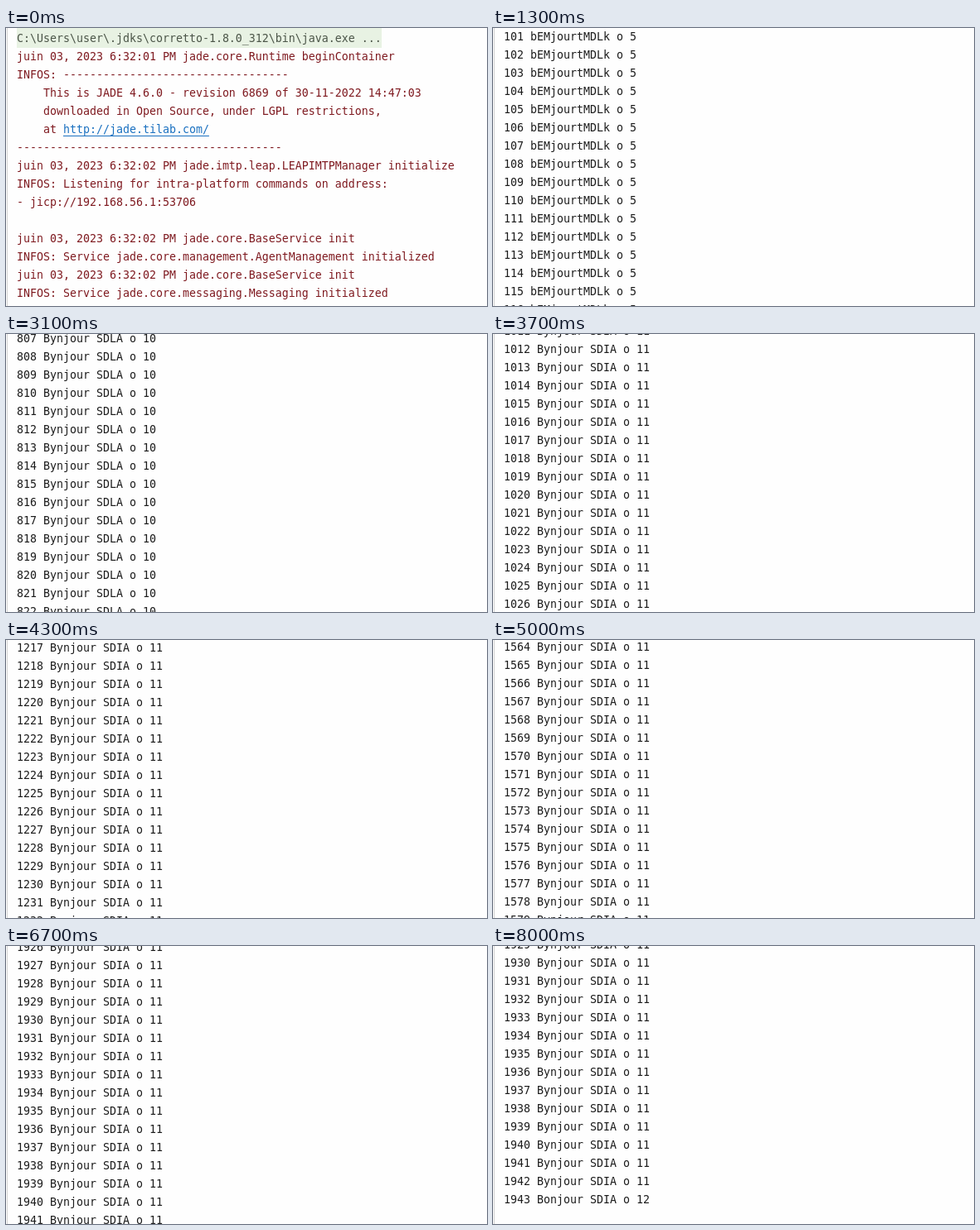
Recreate the animation shown at these times as an HTML page. Size 580 px wide and 336 px high, loop 8.5 s.

```html
<!DOCTYPE html>
<html lang="fr">
<head>
<meta charset="utf-8">
<title>Console</title>
<style>
  html, body { margin: 0; width: 100%; height: 100%; overflow: hidden; background: #fefefe; }
  #console {
    position: relative; width: 580px; height: 336px; overflow: hidden;
    font: 13.29px/22px "DejaVu Sans Mono", monospace; color: #1c1c1c;
  }
  #console::before {
    content: ""; position: absolute; left: 1px; top: 0; width: 1px; height: 100%; background: #d4d4d4;
  }
  .row { position: absolute; left: 13px; top: 0; height: 22px; white-space: pre; }
  .log { color: #7f1a20; }
  .command { color: #4b5548; background: #e8f2e3; box-shadow: 0 -2px #e8f2e3; }
  .link { color: #1a70c0; text-decoration: underline; text-underline-offset: 3px; }
  #caret { position: absolute; left: 13px; top: 319px; width: 2px; height: 17px; background: #000; }
</style>
</head>
<body>
<div id="console"><div id="caret"></div></div>
<script>
const LOOP = 8500, STEP = 100, ROW = 22, TOP = 2;
const stamp = s => `juin 03, 2023 6:32:0${s} PM `;
const dashes = n => "-".repeat(n);
const service = name => [stamp(2) + "jade.core.BaseService init", `INFOS: Service jade.core.${name} initialized`];

const header = [
  "C:\\Users\\user\\.jdks\\corretto-1.8.0_312\\bin\\java.exe ...",
  stamp(1) + "jade.core.Runtime beginContainer",
  "INFOS: " + dashes(34),
  "    This is JADE 4.6.0 - revision 6869 of 30-11-2022 14:47:03",
  "    downloaded in Open Source, under LGPL restrictions,",
  "    at http://jade.tilab.com/",
  dashes(40),
  stamp(2) + "jade.imtp.leap.LEAPIMTPManager initialize",
  "INFOS: Listening for intra-platform commands on address:",
  "- jicp://192.168.56.1:53706",
  "",
  ...service("management.AgentManagement"),
  ...service("messaging.Messaging"),
  ...service("resource.ResourceManagement"),
  ...service("mobility.AgentMobility"),
  ...service("event.Notification"),
  stamp(2) + "jade.core.AgentContainerImpl joinPlatform",
  "INFOS: " + dashes(34),
  "Agent container Container-1@192.168.56.1 is ready.",
  dashes(40)
];

// Best candidate from a given generation onwards
const goal = "Bonjour SDIA", lastGeneration = 1943;
const best = [
  [1, "bEMxqurtMaLk"], [14, "bEMxourtMaLk"], [38, "bEMjourtMaLk"], [70, "bEMjourtMDLk"],
  [150, "bEMjour MDLk"], [190, "bynjour MDLk"], [235, "Bynjour MDLk"], [285, "Bynjour SDLk"],
  [340, "Bynjour SDLA"], [1010, "Bynjour SDIA"], [lastGeneration, goal]
];
const score = text => [...text].filter((c, i) => c === goal[i]).length;

function generation(n) {
  if (n > lastGeneration) return "";
  const text = best.filter(([from]) => from <= n).pop()[1];
  return `${n} ${text} o ${score(text)}`;
}

// [time, generation on the first row]
const scroll = [
  [700, 1 - header.length], [1300, 101.09], [2200, 435.27], [3100, 807.32],
  [4300, 1217.14], [5900, 1891.82], [7000, 1929.636]
];
const secant = i => (scroll[i + 1][1] - scroll[i][1]) / (scroll[i + 1][0] - scroll[i][0]);
const slope = scroll.map((_, i) => {
  if (i === 0 || i === scroll.length - 1) return 0;
  const a = secant(i - 1), b = secant(i);
  return 2 * a * b / (a + b);
});

// Monotone cubic through the scroll points
function firstRow(t) {
  const end = scroll.length - 1;
  if (t <= scroll[0][0]) return scroll[0][1];
  if (t >= scroll[end][0]) return scroll[end][1];
  const i = scroll.findIndex(p => p[0] > t) - 1;
  const [t0, v0] = scroll[i], [t1, v1] = scroll[i + 1];
  const d = t1 - t0, u = (t - t0) / d, u2 = u * u, u3 = u2 * u;
  return v0 + (v1 - v0) * (3 * u2 - 2 * u3) +
    d * (slope[i] * (u3 - 2 * u2 + u) + slope[i + 1] * (u3 - u2));
}

const stage = document.getElementById("console");
const caret = document.getElementById("caret");
const rows = Array.from({ length: 17 }, () => stage.appendChild(document.createElement("div")));

function fill(row, index) {
  const isHeader = index < header.length;
  const text = isHeader ? header[index] : generation(index - header.length + 1);
  row.className = "row" + (index === 0 ? " command" : isHeader ? " log" : "");
  const at = isHeader ? text.indexOf("http://") : -1;
  if (at < 0) {
    row.textContent = text;
    return;
  }
  const link = document.createElement("span");
  link.className = "link";
  link.textContent = text.slice(at);
  row.replaceChildren(text.slice(0, at), link);
}

let shown = -1;
function draw(now) {
  const t = Math.floor((now % LOOP) / STEP) * STEP;
  if (t === shown) return;
  shown = t;
  const offset = Math.round((firstRow(t) + header.length - 1) * ROW);
  const first = Math.max(0, Math.floor(offset / ROW) - 1);
  rows.forEach((row, i) => {
    fill(row, first + i);
    row.style.transform = `translateY(${TOP + (first + i) * ROW - offset}px)`;
  });
  caret.style.visibility = t >= 7400 && t < 8000 ? "visible" : "hidden";
}

const start = performance.now();
function tick() {
  draw(performance.now() - start);
  requestAnimationFrame(tick);
}
tick();
</script>
</body>
</html>
```
